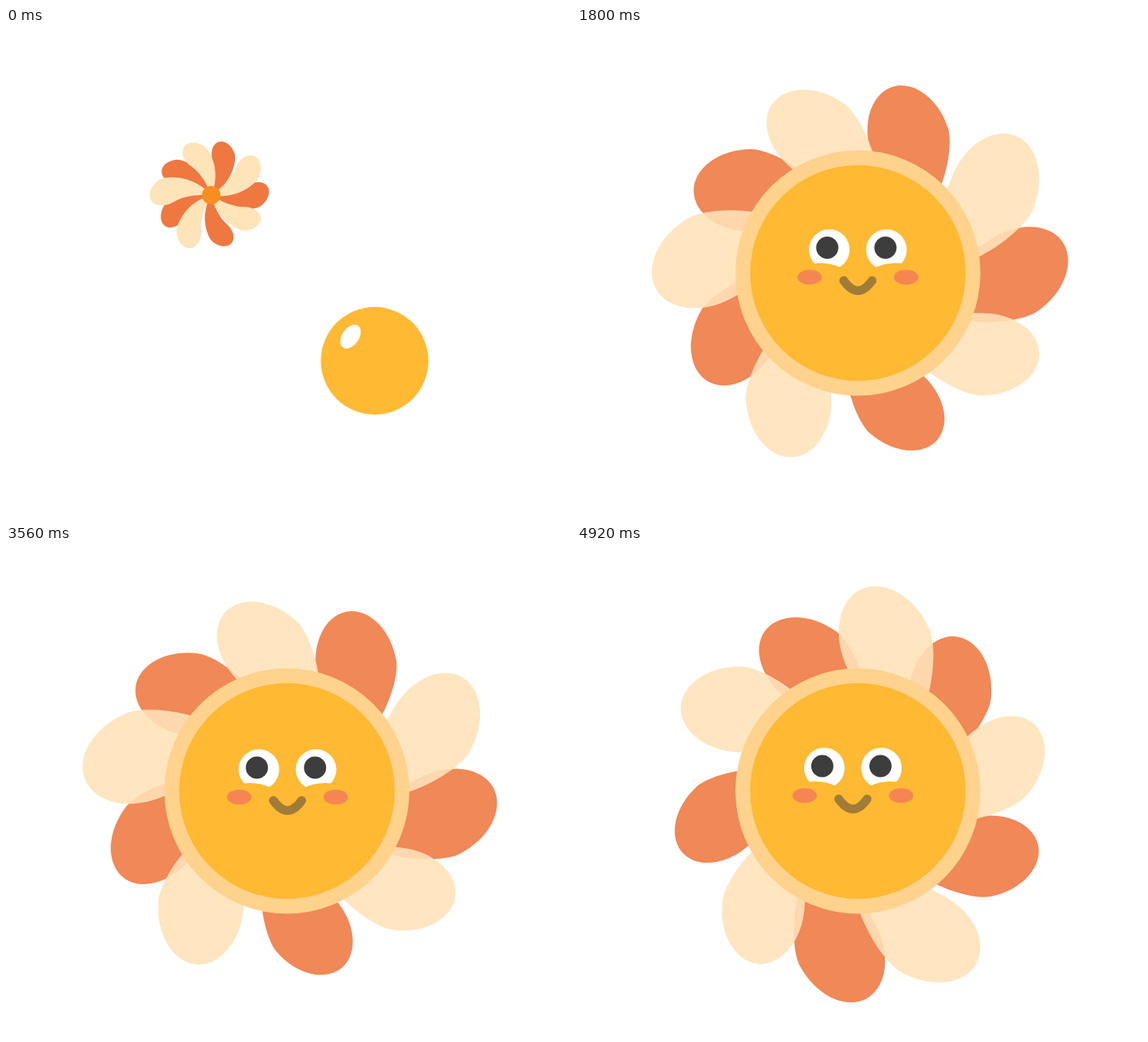
Recreate the animation shown at these times as an HTML page with a canvas. Size 738 by 639 pixels, loop 4960 ms.

```html
<!DOCTYPE html>
<html>
<head>
<meta charset="utf-8">
<style>
html, body { margin: 0; overflow: hidden; background: #fff; }
canvas { display: block; }
</style>
</head>
<body>
<canvas id="stage" width="738" height="639"></canvas>
<script>
const ctx = document.getElementById('stage').getContext('2d');
const LOOP = 4960, TURN = 1800, EXIT_END = 555, POP_START = 600, POP_TIME = 486;
const YELLOW = '#ffb933', RED = '#ee7840', CREAM = '#ffe3b9';
// The petals meet slightly beside the pivot of the flower
const HUB = [12, -.3];

const petalShape = new Path2D(
  'M0 0C-2-60-17-115-42-148C-67-181-68-222-45-240C-21-258 18-245 42-212C60-187 76-80 0 0Z');
// Angle in degrees and size, alternating cream and red
const petals = [
  [212.2, 1.06], [245.9, 1.025], [275.8, 1.125], [305.7, 1.02], [341.2, 1.03],
  [18.4, 1], [57.9, 1.08], [91.5, 1.06], [125.5, 1.02], [167.5, .97]
];
// Time, x and y of the drifting face
const drift = [
  [600, -1, -.4], [1000, -1, -.4], [1800, 0, 0], [2440, -.6, -2],
  [3080, .6, 5.5], [4040, 1, -.7], [4920, -6.5, .5], [4960, -6.5, .5]
];

const clamp = v => Math.min(1, Math.max(0, v));
const backIn = (p, s) => p * p * ((s + 1) * p - s);
const backOut = (p, s) => 1 - backIn(1 - p, s);

function at(x, y, scale, angle, draw) {
  ctx.save();
  ctx.translate(x, y);
  ctx.scale(scale, scale);
  ctx.rotate(angle * Math.PI / 180);
  draw();
  ctx.restore();
}

function oval(color, x, y, rx, ry = rx, tilt = 0) {
  ctx.fillStyle = color;
  ctx.beginPath();
  ctx.ellipse(x, y, rx, ry, tilt, 0, 7);
  ctx.fill();
}

function drawFlower(alpha) {
  ctx.globalAlpha = alpha;
  [[1, RED], [0, CREAM]].forEach(([parity, color]) => {
    petals.forEach(([angle, size], i) => {
      if (i % 2 !== parity) return;
      ctx.fillStyle = color;
      at(...HUB, size, angle, () => ctx.fill(petalShape));
    });
  });
  ctx.globalAlpha = 1;
  oval('#f98d21', ...HUB, 42);
}

function drawFace() {
  for (const side of [-1, 1]) {
    oval('#fff', side * 37.3, -31, 26.5);
    oval('#3d3d3d', side * 38 - 2, -33.5, 14.5);
    oval(YELLOW, side * 49, 6.5, 36, 20);
    oval('#f58653', side * 63, 5, 16, 9.7);
  }
  ctx.strokeStyle = '#a07c38';
  ctx.lineWidth = 11.5;
  ctx.lineCap = 'round';
  ctx.beginPath();
  ctx.moveTo(-18.5, 9.5);
  ctx.quadraticCurveTo(0, 35.5, 18.5, 9.5);
  ctx.stroke();
}

function faceOffset(t) {
  const i = Math.max(1, drift.findIndex(key => key[0] > t));
  const [a, b] = [drift[i - 1], drift[i]];
  const p = (1 - Math.cos(Math.PI * clamp((t - a[0]) / (b[0] - a[0])))) / 2;
  return [a[1] + (b[1] - a[1]) * p, a[2] + (b[2] - a[2]) * p];
}

function drawParts(t, spin) {
  const move = backIn(clamp(t / EXIT_END), 1.70158);
  at(264.6 + 562 * move, 218.1, .287, spin, () => drawFlower(1));
  at(481.5, 434 + 282 * move, 1, 0, () => {
    oval(YELLOW, 0, 0, 70.2);
    oval('#fff', -31.5, -31.5, 11, 17.3, .61);
  });
}

function drawSun(t, spin) {
  const scale = backOut(clamp((t - POP_START) / POP_TIME), 4);
  at(366, 319.3, scale, spin, () => drawFlower(.88));
  at(366.9, 320, scale, 0, () => {
    oval('#ffd28e', 0, -.5, 160);
    oval(YELLOW, .1, -.5, 140.8);
    ctx.translate(...faceOffset(t));
    drawFace();
  });
}

function frame(now) {
  const t = now % LOOP;
  const spin = -360 * t / TURN;
  ctx.fillStyle = '#fff';
  ctx.fillRect(0, 0, 738, 639);
  if (t < EXIT_END) drawParts(t, spin);
  else if (t > POP_START) drawSun(t, spin);
  requestAnimationFrame(start);
}

let origin;
function start(now) {
  origin ??= now;
  frame(now - origin);
}
requestAnimationFrame(start);
</script>
</body>
</html>
```
